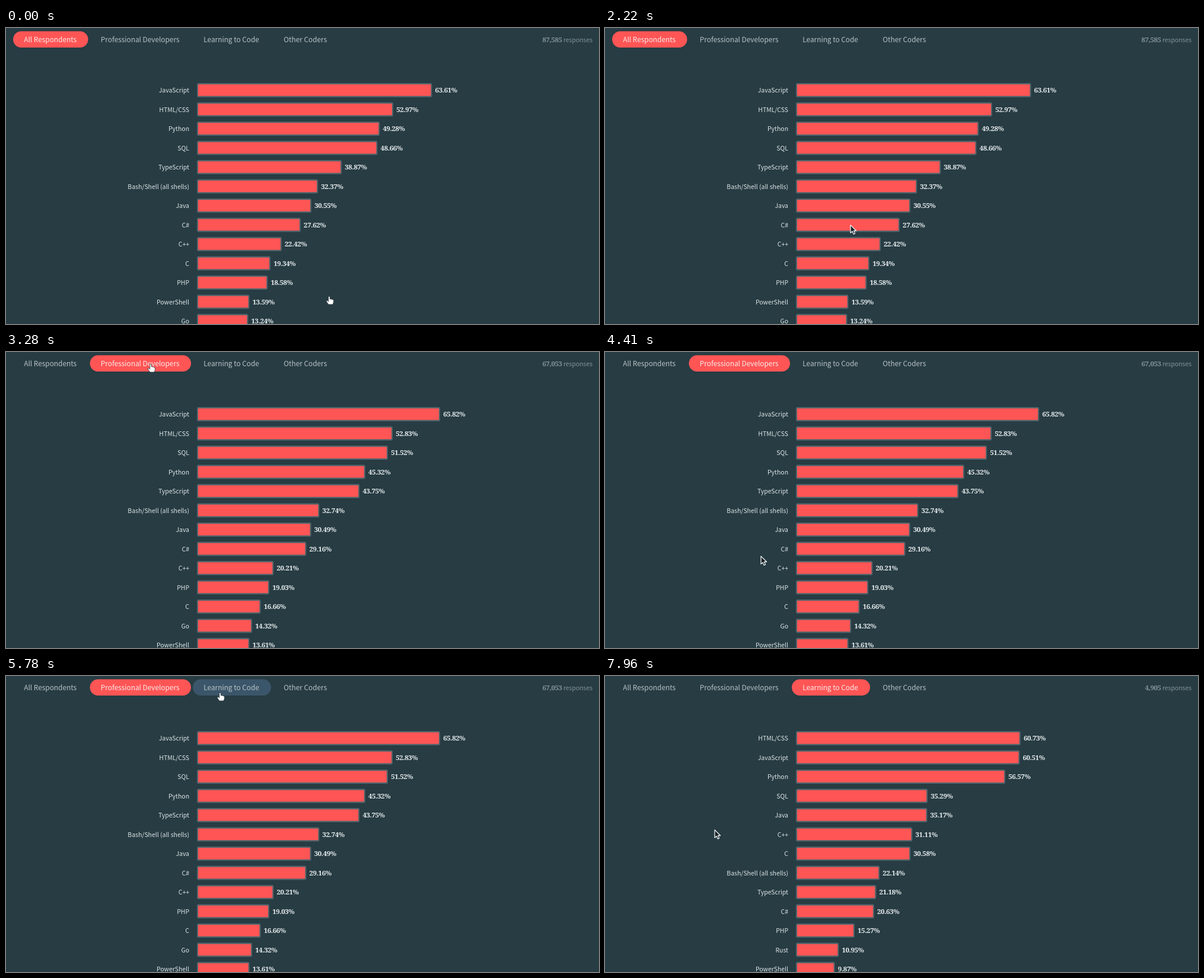
Write an HTML page with a canvas that moves like this. It is 1000 px wide and 500 px high and loops after 8000 ms.

```html
<!DOCTYPE html>
<html lang="en">
<head>
<meta charset="utf-8">
<title>Survey chart</title>
<style>
  html, body { margin: 0; width: 100%; height: 100%; overflow: hidden; background: #273c43; }
  canvas { display: block; width: 1000px; height: 500px; }
</style>
</head>
<body>
<canvas id="stage" width="1000" height="500"></canvas>
<script>
const ctx = document.getElementById('stage').getContext('2d');
const LOOP = 8000;
const SANS = '"Noto Sans CJK JP", "Noto Sans CJK SC", "Noto Sans CJK", sans-serif';
const SERIF = '"Noto Serif", serif';
const RED = '#ff5555';

const tabs = [
  { label: 'All Respondents', x: 12, w: 126.5 },
  { label: 'Professional Developers', x: 141.5, w: 170.5 },
  { label: 'Learning to Code', x: 315, w: 132 },
  { label: 'Other Coders', x: 450, w: 111 }
];

const charts = [
  { from: 0, responses: '87,585', rows: [
    ['JavaScript', 63.61], ['HTML/CSS', 52.97], ['Python', 49.28], ['SQL', 48.66],
    ['TypeScript', 38.87], ['Bash/Shell (all shells)', 32.37], ['Java', 30.55],
    ['C#', 27.62], ['C++', 22.42], ['C', 19.34], ['PHP', 18.58],
    ['PowerShell', 13.59], ['Go', 13.24]] },
  { from: 3050, responses: '67,053', rows: [
    ['JavaScript', 65.82], ['HTML/CSS', 52.83], ['SQL', 51.52], ['Python', 45.32],
    ['TypeScript', 43.75], ['Bash/Shell (all shells)', 32.74], ['Java', 30.49],
    ['C#', 29.16], ['C++', 20.21], ['PHP', 19.03], ['C', 16.66],
    ['Go', 14.32], ['PowerShell', 13.61]] },
  { from: 5940, responses: '4,905', rows: [
    ['HTML/CSS', 60.73], ['JavaScript', 60.51], ['Python', 56.57], ['SQL', 35.29],
    ['Java', 35.17], ['C++', 31.11], ['C', 30.58], ['Bash/Shell (all shells)', 22.14],
    ['TypeScript', 21.18], ['C#', 20.63], ['PHP', 15.27], ['Rust', 10.95],
    ['PowerShell', 9.87]] }
];

// Pointer hot spot: time, x, y
const path = [
  [0, 545, 453], [120, 545, 453], [1100, 470, 375], [1800, 414, 333],
  [2260, 414, 333], [2850, 244, 20], [3400, 244, 20], [4200, 263, 345],
  [5000, 263, 345], [5640, 361, 28], [6080, 361, 28], [6600, 377, 283],
  [6750, 377, 283], [7650, 185, 260], [LOOP, 185, 260]
];

const arrow = new Path2D('M0 0V13.2L3.1 10.4L5.2 15.2L7.6 14.2L5.5 9.5H9.6Z');
const hand = new Path2D('M-1.3 1Q0-.6 1.3 1V5Q2.5 4.2 3.5 5.3Q4.7 4.6 5.6 5.8Q7.2 5.4 7.4 7V10.5L6 14H-1.2L-4 10L-4.8 7.8Q-4 6.6-2.8 7.6L-1.3 9Z');

function pointerAt(t) {
  const i = path.findIndex(key => key[0] > t);
  const [t0, x0, y0] = path[i - 1];
  const [t1, x1, y1] = path[i];
  const k = (t - t0) / (t1 - t0);
  const e = k * k * (3 - 2 * k);
  return { x: x0 + (x1 - x0) * e, y: y0 + (y1 - y0) * e };
}

function text(str, x, y, font, color, align = 'left', spacing = 0) {
  ctx.font = font;
  ctx.fillStyle = color;
  ctx.textAlign = align;
  ctx.letterSpacing = spacing + 'px';
  ctx.fillText(str, x, y);
}

function roundRect(x, y, w, h, r, color) {
  ctx.fillStyle = color;
  ctx.beginPath();
  ctx.roundRect(x, y, w, h, r);
  ctx.fill();
}

function drawTabs(active, hovered) {
  tabs.forEach((tab, i) => {
    if (i === active) roundRect(tab.x, 5.5, tab.w, 27.5, 13.75, RED);
    else if (i === hovered) roundRect(tab.x, 5.5, tab.w, 27.5, 13.75, '#3b566a');
    text(tab.label, tab.x + 18.3, 23.5, '11.84px ' + SANS, i === active ? '#fbecec' : '#b9c3c6');
  });
}

function drawChart({ responses, rows }) {
  text('responses', 989, 23.5, '10.4px ' + SANS, '#84949a', 'right');
  text(responses, 937.5, 23.5, 'bold 11.5px ' + SERIF, '#84949a', 'right', -0.4);
  rows.forEach(([label, value], i) => {
    const y = 105 + i * 32.5;
    const w = 4.9 + value * 6.155;
    text(label, 309, y + 4.3, '10.45px ' + SANS, '#dfe5e7', 'right');
    roundRect(322, y - 12, w, 24, 2.5, '#51646b');
    roundRect(324, y - 9.8, w - 4, 19.6, 1, RED);
    text(value.toFixed(2) + '%', 322 + w + 5.2, y + 4.2, 'bold 11.5px ' + SERIF, '#e9eeef', 'left', -0.4);
  });
}

function drawPointer({ x, y }, isHand) {
  const shape = isHand ? hand : arrow;
  ctx.save();
  ctx.translate(x, y);
  ctx.lineJoin = 'round';
  ctx.lineWidth = isHand ? 0.8 : 1.3;
  ctx.fillStyle = isHand ? '#ffffff' : '#172126';
  ctx.strokeStyle = isHand ? '#27343a' : '#e8eced';
  ctx.fill(shape);
  ctx.stroke(shape);
  ctx.restore();
}

function draw(t) {
  const active = charts.findLastIndex(chart => t >= chart.from);
  const pointer = pointerAt(t);
  const hovered = pointer.y > 5 && pointer.y < 33
    ? tabs.findIndex(tab => pointer.x >= tab.x && pointer.x <= tab.x + tab.w) : -1;
  ctx.fillStyle = '#273c43';
  ctx.fillRect(0, 0, 1000, 500);
  drawTabs(active, hovered);
  drawChart(charts[active]);
  drawPointer(pointer, hovered >= 0 || t < 120);
}

const start = performance.now();
function tick() {
  draw((performance.now() - start) % LOOP);
  requestAnimationFrame(tick);
}
tick();
</script>
</body>
</html>
```
